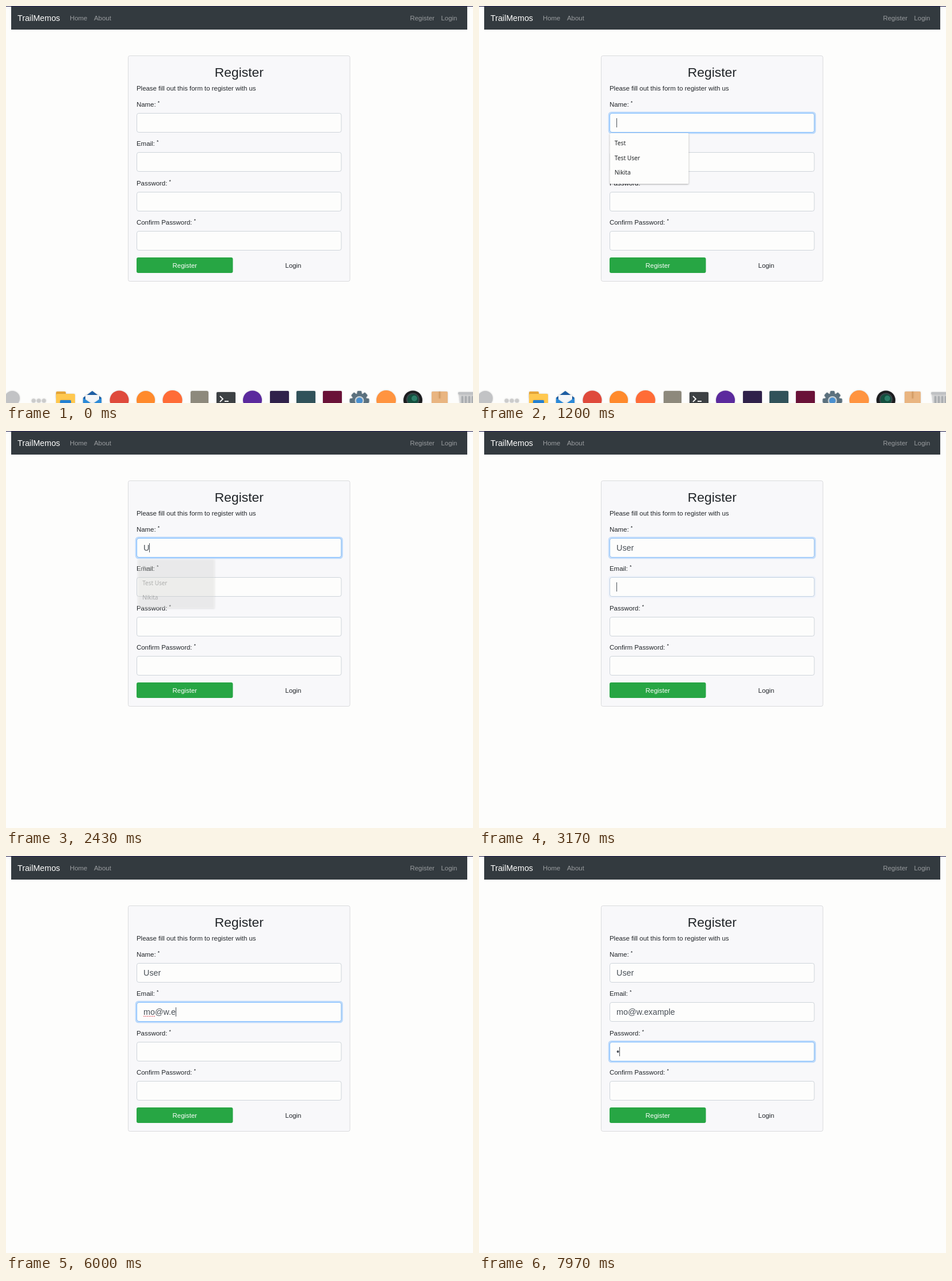
These frames come from a looping animation (812 by 690 pixels, 8 s). An HTML page with a canvas:

```html
<!DOCTYPE html>
<html lang="en">
<head>
<meta charset="utf-8">
<title>Register</title>
<style>
  html, body { margin: 0; width: 100%; height: 100%; overflow: hidden; background: #fdfdfc; }
  canvas { display: block; }
</style>
</head>
<body>
<canvas id="stage" width="812" height="690"></canvas>
<script>
const ctx = document.getElementById('stage').getContext('2d');
const LOOP = 8000;
const SANS = '"Liberation Sans", Arial, sans-serif';
const NOTO = '"Noto Sans", "Open Sans", sans-serif';
const REM = 11.43;
const INK = '#212529', PAGE = '#fdfdfc';

// Each field: focus span, caret resets while focused, key times.
const fields = [
  { label: 'Name:', y: 186, text: 'User', from: 970, to: 3130, keys: [2270, 2560, 2680, 2800] },
  { label: 'Email:', y: 254, text: 'mo@w.example', from: 3130, to: 7060, wake: 4970, spell: 2,
    keys: [3650, 3960, 5110, 5700, 5850, 5970, 6110, 6230, 6430, 6570, 6700, 6830] },
  { label: 'Password:', y: 323, text: '•', from: 7060, to: 9999, keys: [7900] },
  { label: 'Confirm Password:', y: 391, text: '', from: 9999, to: 9999, keys: [] }
];

const clamp = v => Math.max(0, Math.min(1, v));
const smooth = v => { v = clamp(v); return v * v * (3 - 2 * v); };
const ramp = (t, start, length) => smooth((t - start) / length);

function text(str, x, y, size, color, align = 'left', family = SANS) {
  ctx.font = `${size}px ${family}`;
  ctx.textAlign = align;
  ctx.fillStyle = color;
  ctx.fillText(str, x, y);
}

function box(x, y, w, h, r, fill, stroke) {
  ctx.beginPath();
  ctx.roundRect(x, y, w, h, r);
  if (fill) { ctx.fillStyle = fill; ctx.fill(); }
  if (stroke) { ctx.strokeStyle = stroke; ctx.lineWidth = 1; ctx.stroke(); }
}

function disc(x, y, r, color) {
  ctx.beginPath();
  ctx.arc(x, y, r, 0, Math.PI * 2);
  ctx.fillStyle = color;
  ctx.fill();
}

function poly(color, ...pts) {
  ctx.beginPath();
  for (let i = 0; i < pts.length; i += 2) ctx.lineTo(pts[i], pts[i + 1]);
  ctx.closePath();
  ctx.fillStyle = color;
  ctx.fill();
}

function drawNav() {
  ctx.fillStyle = '#1c1a4a';
  ctx.fillRect(0, 0, 812, 1);
  ctx.fillStyle = '#333a3f';
  ctx.fillRect(9, 1, 793, 40);
  text('TrailMemos', 20, 25.5, 14.28, '#fdfdfc');
  const link = '#999c9f';
  text('Home', 111, 24.5, REM, link);
  text('About', 153, 24.5, REM, link);
  text('Register', 702.5, 24.5, REM, link);
  text('Login', 756.5, 24.5, REM, link);
}

function drawCard() {
  box(212.5, 86.5, 385.5, 392, 3, '#f8f8fa', '#dadbdd');
  text('Register', 405.3, 123, 22.86, INK, 'center');
  text('Please fill out this form to register with us', 227, 146.5, REM, INK);
  box(227, 437, 167.5, 27, 3, '#27a644');
  text('Register', 310.8, 454.5, REM, '#fdfdfc', 'center');
  text('Login', 499.5, 454.5, REM, INK, 'center');
}

function drawCaret(f, t, x) {
  const last = Math.max(f.from, ...[...f.keys, f.wake || 0].filter(k => k <= t));
  if ((t - last) % 1200 >= 600) return;
  ctx.fillStyle = '#495057';
  ctx.fillRect(Math.round(x), f.y + 9, 1, 16);
}

function drawField(f, t) {
  const { y } = f;
  text(f.label, 227, y - 11, REM, INK);
  const end = 227 + ctx.measureText(f.label + ' ').width;
  text('*', end, y - 15, REM * 0.75, INK);

  box(227.5, y + 0.5, 355.5, 33, 3.4, PAGE, '#ced4da');
  const glow = ramp(t, f.from, 150) * (1 - ramp(t, f.to, 150));
  if (glow > 0) {
    ctx.globalAlpha = glow;
    ctx.beginPath();
    ctx.roundRect(224.7, y - 2.3, 361.1, 38.6, 5.5);
    ctx.roundRect(227, y, 356.5, 34, 3.4);
    ctx.fillStyle = 'rgba(0,123,255,.25)';
    ctx.fill('evenodd');
    box(227.5, y + 0.5, 355.5, 33, 3.4, null, '#80bdff');
    ctx.globalAlpha = 1;
  }

  const count = f.keys.filter(k => k <= t).length;
  const typed = f.text.slice(0, count);
  text(typed, 239.1, y + 22, 14.28, '#495057');
  const focused = t >= f.from && t < f.to;
  if (!focused) return;
  if (f.spell && count > f.spell) {
    const w = ctx.measureText(f.text.slice(0, f.spell)).width;
    ctx.fillStyle = '#e0505c';
    for (let x = 0; x < w; x += 3) ctx.fillRect(239 + x, y + 24, 2, 1);
  }
  drawCaret(f, t, 239.1 + ctx.measureText(typed).width);
}

function drawPopup(t) {
  const show = ramp(t, 1000, 130);
  const hide = clamp((t - 2330) / 145);
  const alpha = show * (1 - hide);
  if (alpha <= 0) return;
  ctx.save();
  ctx.globalAlpha = alpha;
  const s = 1 - 0.035 * Math.max(1 - show, hide);
  ctx.translate(296, 265);
  ctx.scale(s, s);
  ctx.translate(-296, -265);
  ctx.shadowColor = 'rgba(0,0,0,.32)';
  ctx.shadowBlur = 3;
  ctx.shadowOffsetY = 1;
  box(227.5, 221, 137, 88, 1.5, PAGE);
  ctx.shadowColor = 'transparent';
  ['Test', 'Test User', 'Nikita'].forEach((name, i) =>
    text(name, 235.8, 242 + i * 25.7, 10.2, '#1f2224', 'left', NOTO));
  ctx.restore();
}

function drawGear(x, y) {
  ctx.save();
  ctx.translate(x, y);
  for (let i = 0; i < 8; i++) {
    ctx.rotate(Math.PI / 4);
    box(-4, -17, 8, 8, 2, '#5d7380');
  }
  ctx.restore();
  disc(x, y, 13, '#5d7380');
  disc(x, y, 8, '#c9d4da');
  disc(x, y, 5.5, '#4a90d0');
}

function drawDock(t) {
  const drop = 28 * Math.pow(clamp((t - 1670) / 230), 1.45);
  if (drop >= 26) return;
  ctx.save();
  ctx.translate(0, drop);
  ctx.shadowColor = 'rgba(0,0,0,.18)';
  ctx.shadowBlur = 3;

  disc(11, 682, 13, '#c2c3c5');
  for (const x of [48, 57, 66]) disc(x, 686, 3.5, '#cbcbcb');

  // folder
  box(87, 670, 17, 12, 2, '#e9a83a');
  box(87, 674, 33, 26, 2, '#ffc84f');
  box(94, 685, 19, 12, 1.5, '#2380d2');

  // envelope
  poly('#1d5fa6', 134, 681, 150, 669, 166, 681, 166, 700, 134, 700);
  box(138, 676, 24, 18, 1, '#f4f6f8');
  poly('#2b8ad8', 134, 681, 150, 692, 166, 681, 166, 706, 134, 706);

  disc(197, 685, 16.5, '#df4a3c');
  disc(243, 685, 16, '#ff8a2c');
  disc(289.5, 685, 17, '#ff6c37');
  box(321, 669, 31, 31, 3, '#8d897c');

  // terminal
  box(366, 671, 33, 28, 2, '#3d4144');
  ctx.strokeStyle = '#f0f0f0';
  ctx.lineWidth = 2;
  ctx.beginPath();
  ctx.moveTo(372, 678);
  ctx.lineTo(377, 683);
  ctx.lineTo(372, 688);
  ctx.moveTo(380, 687);
  ctx.lineTo(387, 687);
  ctx.stroke();

  disc(428.5, 685, 16.5, '#5b2a9d');
  box(459, 669, 33, 33, 2, '#30214a');
  box(505, 669, 33, 33, 2, '#31525a');
  box(551, 669, 33, 33, 2, '#6a1238');
  drawGear(614.5, 686);
  disc(661, 685, 17, '#ff9440');

  // camera lens
  disc(707.5, 685, 16.5, '#1d1e20');
  disc(707.5, 684, 11.5, '#3f4a50');
  disc(707.5, 684, 9.5, '#14503f');
  disc(710, 682, 5, '#2b7d68');

  // parcel
  box(740, 670, 28, 30, 2, '#e9b581');
  ctx.fillStyle = '#d59c62';
  ctx.fillRect(753, 670, 2, 12);

  // bin
  poly('#d5d6d7', 787, 673, 817, 673, 813, 706, 791, 706);
  box(786, 671, 32, 4, 2, '#bfc1c3');
  for (let i = 0; i < 4; i++) box(792 + i * 6, 678, 3, 14, 1, '#a9acaf');
  ctx.restore();
}

function draw(t) {
  ctx.fillStyle = PAGE;
  ctx.fillRect(0, 0, 812, 690);
  drawNav();
  drawCard();
  fields.forEach(f => drawField(f, t));
  drawPopup(t);
  drawDock(t);
}

let start = null;
function tick(now) {
  if (start === null) start = now;
  draw((now - start) % LOOP);
  requestAnimationFrame(tick);
}
draw(0);
requestAnimationFrame(tick);
</script>
</body>
</html>
```
